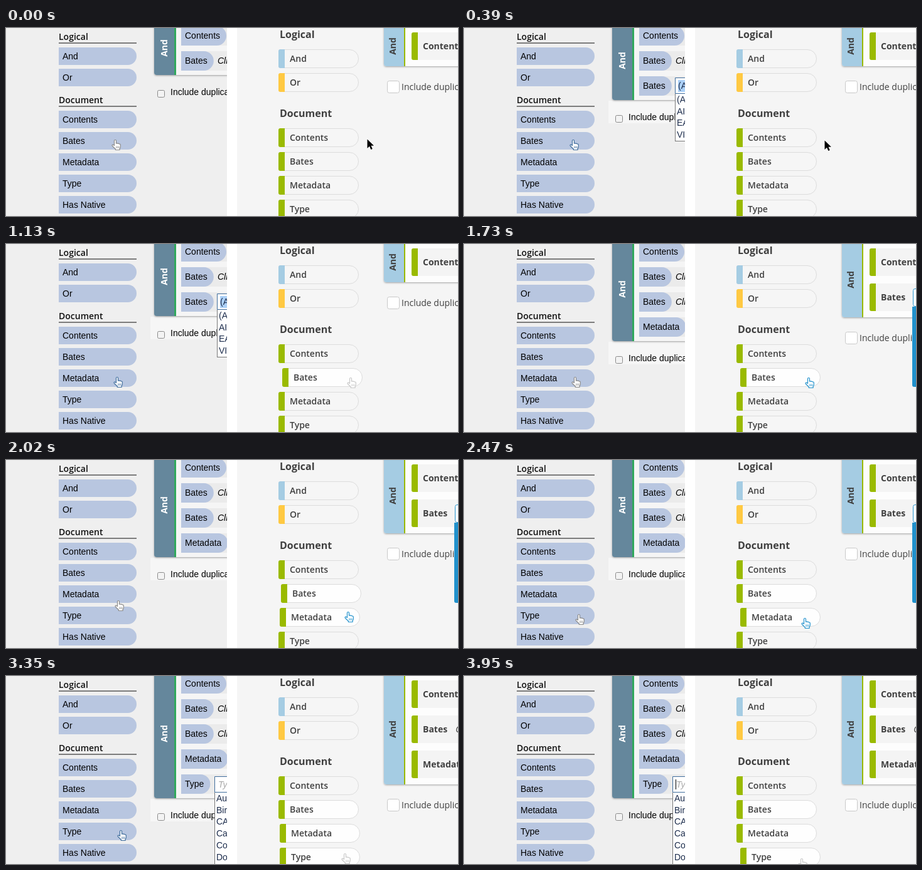
Animation of 720x300 px, one loop 5950 ms. Source, as an HTML page with a canvas:

```html
<!DOCTYPE html>
<html lang="en">
<head>
<meta charset="utf-8">
<title>Query builder, before and after</title>
<style>
html, body { margin: 0; width: 100%; height: 100%; overflow: hidden; background: #fff; }
canvas { display: block; }
</style>
</head>
<body>
<canvas id="stage" width="720" height="300"></canvas>
<script>
const ctx = document.getElementById('stage').getContext('2d');
const LOOP = 5950;
const BEAT = 148;
const STALLS = [21, 23, 24];
const ARIAL = '"Liberation Sans", Arial, sans-serif';
const OPEN = '"Open Sans", sans-serif';
const GREEN = '#9aba00', SKY = '#a5cce3', INK = '#404040', NAVY = '#1c2c4c';

function beatAt(ms) {
  const beat = Math.min(26, Math.floor((ms - 88) / BEAT));
  return beat - STALLS.filter(stall => stall <= beat).length;
}

function ease(beat, from, to) {
  const p = Math.min(1, Math.max(0, (beat - from) / (to - from)));
  return p * p * (3 - 2 * p);
}

function travel(beat, start, moves) {
  let [x, y] = start;
  for (const { from, to, at } of moves) {
    const p = ease(beat, from, to);
    x += (at[0] - x) * p;
    y += (at[1] - y) * p;
  }
  return [Math.round(x), Math.round(y)];
}

const leftPointer = beat => travel(beat, [168, 178], [
  { from: 3, to: 7, at: [171, 212] },
  { from: 11, to: 16, at: [177, 246] },
  { from: 21, to: 23, at: [172, 310] }
]);
const rightPointer = beat => travel(beat, [575, 177], [
  { from: -1, to: 2, at: [574, 179] },
  { from: 3, to: 5, at: [543, 213] },
  { from: 11, to: 14, at: [537, 252] },
  { from: 19, to: 21, at: [534, 283] },
  { from: 21, to: 23, at: [532, 291] }
]);

const hovers = {
  Bates: { enter: 4, leave: 12 },
  Metadata: { enter: 12, leave: 19 },
  Type: { enter: 20, leave: Infinity }
};

function slide({ enter, leave }, beat) {
  const out = leave < Infinity ? ease(beat, leave, leave + 3) : 0;
  return 6 * (ease(beat, enter, enter + 3) - out);
}

function rect(x, y, w, h, fill) {
  ctx.fillStyle = fill;
  ctx.fillRect(x, y, w, h);
}

function rounded(x, y, w, h, radii, fill, stroke) {
  ctx.beginPath();
  ctx.roundRect(x, y, w, h, radii);
  if (fill) { ctx.fillStyle = fill; ctx.fill(); }
  if (stroke) { ctx.strokeStyle = stroke; ctx.lineWidth = 1; ctx.stroke(); }
}

function text(str, x, y, font, fill) {
  ctx.font = font;
  ctx.fillStyle = fill;
  ctx.fillText(str, x, y);
}

function isolated(draw) {
  ctx.save();
  draw();
  ctx.restore();
}

function verticalText(str, x, y, fill) {
  isolated(() => {
    ctx.translate(x, y);
    ctx.rotate(-Math.PI / 2);
    ctx.textAlign = 'center';
    text(str, 0, 0, 'bold 14px ' + OPEN, fill);
  });
}

function clipped(x, w, draw) {
  isolated(() => {
    ctx.beginPath();
    ctx.rect(x, 0, w, 300);
    ctx.clip();
    draw();
  });
}

function panel(x, bottom, column, line, lineWidth, fill) {
  isolated(() => {
    ctx.shadowColor = 'rgba(0,0,0,.35)';
    ctx.shadowBlur = 3;
    ctx.shadowOffsetY = 1;
    rounded(x, -10, 140, bottom + 10, 4, fill);
  });
  rounded(x, -10, 32, bottom + 10, [0, 0, 0, 4], column);
  rect(x + 32, 0, lineWidth, bottom, line);
}

const handPath = new Path2D('M4.5 9.5V2a1.5 1.5 0 0 1 3 0V6.2q1.7-1 2.5.3q1.6-.8 2.3.6' +
  'q1.9-.4 2 1.3V11.5q0 1.6-1.2 2.7V16.5H6.3V15L1.8 10.8q-1.3-1.4-.6-2.2q1-1 2.2.1Z');
const creases = new Path2D('M7.8 10.5v3.5M9.8 10.5v3.5M11.8 10.5v3.5');
const arrowPath = new Path2D('M.5 .5V15L4 11.8L6.3 17L8.8 16L6.5 10.8H11Z');

function hand(x, y) {
  isolated(() => {
    ctx.translate(x, y);
    ctx.fillStyle = '#fff';
    ctx.lineWidth = 1.2;
    ctx.lineJoin = 'round';
    ctx.fill(handPath);
    ctx.stroke(handPath);
    ctx.lineWidth = 0.8;
    ctx.stroke(creases);
  });
}

function arrow(x, y) {
  isolated(() => {
    ctx.translate(x, y);
    ctx.strokeStyle = '#fff';
    ctx.lineWidth = 1.6;
    ctx.stroke(arrowPath);
    ctx.fillStyle = '#000';
    ctx.fill(arrowPath);
  });
}

function oldPill(label, x, y, w, h) {
  rounded(x, y, w, h, [0, h / 2, h / 2, 0], '#b8c6e0');
  text(label, x + 6, Math.round(y + h / 2 + 4.5), '14px ' + ARIAL, '#000');
}

function oldSection(title, y, labels) {
  text(title, 84, y + 19, '600 14px ' + OPEN, '#111');
  rect(84, y + 23, 124, 2, '#7c7c7c');
  labels.forEach((label, i) => oldPill(label, 84, y + 31 + i * 34, 124, 28));
}

function oldDropdown(x, y, bottom, items) {
  rect(x, y, 40, bottom - y, '#777');
  rect(x + 1, y, 39, bottom - y - 1, '#fff');
  items.forEach((item, i) => text(item, x + 3, y + 14 + i * 18.7, '14px ' + ARIAL, NAVY));
}

function oldInput(x, y) {
  rounded(x + 0.5, y + 0.5, 40, 25, 0, '#fff', '#3f6d9c');
}

function drawOld(beat) {
  const count = 2 + [0, 11, 19].filter(added => beat >= added).length;
  const extra = (count - 2) * 40;
  rect(0, 0, 352, 300, '#efefef');
  oldSection('Logical', 0, ['And', 'Or']);
  oldSection('Document', 101, ['Contents', 'Bates', 'Metadata', 'Type', 'Has Native']);

  if (beat >= 0 && beat < 23) rect(230, 76 + extra, 122, 36, '#f6f6f6');
  panel(236, 75 + extra, '#65879c', '#31a85c', 3, '#f5f5f5');
  verticalText('And', 257, 32 + extra / 2, '#fff');

  ['Contents', 'Bates', 'Bates', 'Metadata', 'Type'].slice(0, count).forEach((label, i) => {
    const y = i * 40 - 3;
    rect(279, y, 80, 31, '#ebebeb');
    ctx.font = '14px ' + ARIAL;
    oldPill(label, 279, y, ctx.measureText(label).width + 16, 31);
    if (label === 'Bates') text('Click', 337, y + 20, 'italic 14px ' + ARIAL, '#000');
  });

  rounded(241.5, 99.5 + extra, 11, 11, 2, '#f3f3f3', '#8a8a8a');
  text('Include duplicates', 262, 107 + extra, '14px ' + ARIAL, '#000');

  if (count === 3) {
    oldInput(336, 79);
    rect(341, 83, 20, 19, '#abd0f7');
    text('(Any)', 341, 97, '14px ' + ARIAL, NAVY);
    if (beat >= 2) oldDropdown(336, 105, 181, ['(Any)', 'AI', 'EA', 'VI']);
  }
  if (count === 5) {
    oldInput(332, 160);
    text('Type', 338, 178, 'italic 14px ' + ARIAL, '#a8a8a8');
    if (beat < 21 || beat >= 23) rect(337, 165, 1, 16, '#000');
    if (beat >= 20) oldDropdown(332, 186, 320, ['Author', 'Birth', 'CAD', 'Case', 'Code', 'Doc']);
  }
  hand(...leftPointer(beat));
}

function newPill(label, y, color, beat) {
  const hover = hovers[label];
  const x = 434 + (hover ? Math.round(slide(hover, beat)) : 0);
  const fill = hover && beat > hover.enter ? '#fefefe' : '#f6f6f6';
  rounded(x + 0.5, y + 0.5, 127, 29, [3, 15, 15, 3], fill, '#dcdcdc');
  rounded(x, y, 10, 30, [3, 0, 0, 3], color);
  text(label, x + 18, y + 20, '600 14px ' + OPEN, INK);
}

function newSection(title, y, labels, colors, beat) {
  text(title, 436, y + 16, 'bold 16px ' + OPEN, INK);
  labels.forEach((label, i) => newPill(label, y + 34 + i * 38, colors[i % colors.length], beat));
}

function drawNew(beat) {
  const count = 1 + [11, 19].filter(added => beat >= added).length;
  const extra = (count - 1) * 56;
  rect(368, 0, 352, 300, '#f5f5f5');
  newSection('Logical', 0, ['And', 'Or'], [SKY, '#ffc943'], beat);
  newSection('Document', 126, ['Contents', 'Bates', 'Metadata', 'Type'], [GREEN], beat);

  panel(602, 61 + extra, SKY, GREEN, 2, '#fdfdfd');
  verticalText('And', 621, 29 + extra / 2, INK);
  ['Contents', 'Bates', 'Metadata'].slice(0, count).forEach((label, i) => {
    const y = 7 + i * 56;
    rounded(646, y, 90, 44, 3, '#f4f4f4');
    rounded(646, y, 10, 44, [3, 0, 0, 3], GREEN);
    text(label, 664, y + 27, 'bold 14px ' + OPEN, INK);
  });
  if (count === 3) text('Click', 716, 90, 'italic 14px ' + OPEN, INK);

  rounded(607.5, 84.5 + extra, 19, 19, 3, '#fff', '#c8c8c8');
  text('Include duplicates', 630, 99 + extra, '14px ' + OPEN, INK);

  if (count === 2) {
    rounded(715.5, 71.5, 30, 28, 3, '#fff', '#2191cc');
    rounded(714, 100, 30, 128, [0, 0, 0, 3], '#2191cc');
  }
  const pointer = beat < 5 ? arrow : hand;
  pointer(...rightPointer(beat));
}

const start = performance.now();
function tick() {
  const beat = beatAt((performance.now() - start) % LOOP);
  rect(0, 0, 720, 300, '#fff');
  clipped(0, 352, () => drawOld(beat));
  clipped(368, 352, () => drawNew(beat));
  requestAnimationFrame(tick);
}
tick();
</script>
</body>
</html>
```
